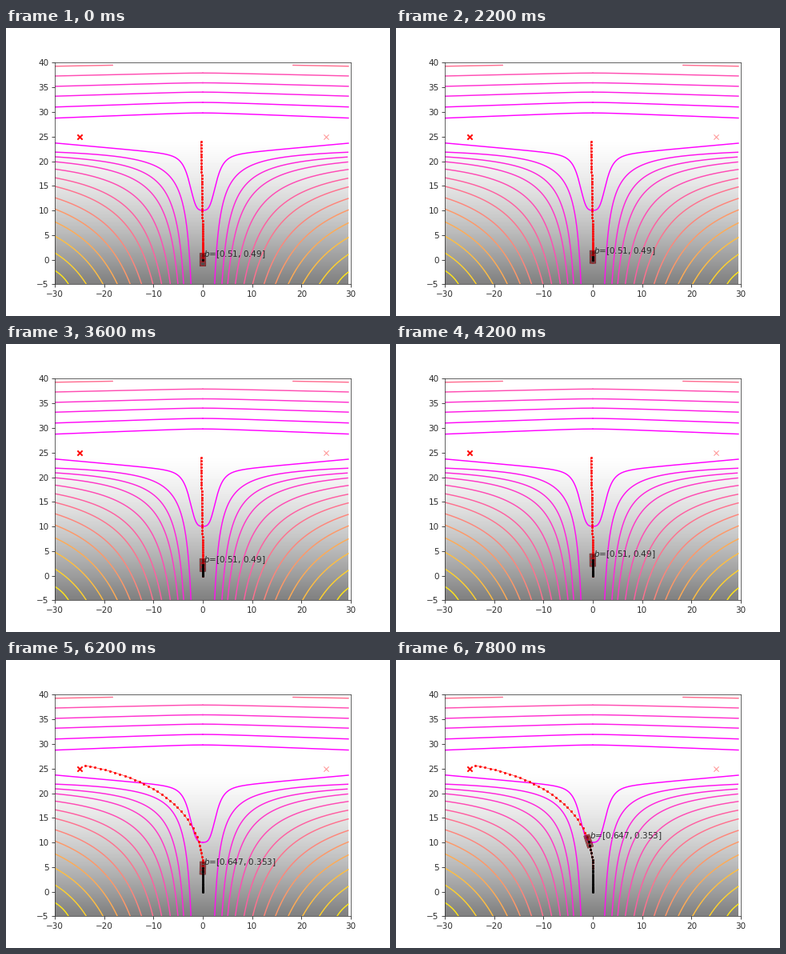
These frames come from a looping animation (480x360 px, 8 s). A matplotlib script:

```python
import numpy as np
import matplotlib.pyplot as plt
from matplotlib.animation import FuncAnimation
from matplotlib.patches import Circle, Rectangle
from matplotlib.transforms import Affine2D

V0, ACC = 0.03, 0.0105      # start speed and half acceleration per step
SWITCH = 20                 # step at which the plan is renewed
INK = "#2a2a2a"
spring = plt.get_cmap("spring")

plt.rcParams.update({"axes.edgecolor": INK, "xtick.color": INK,
                     "ytick.color": INK, "text.color": INK,
                     "axes.linewidth": 0.7})
fig = plt.figure(figsize=(6.4, 4.8), dpi=75)
ax = fig.add_axes([61 / 480, 39.6 / 360, 370 / 480, 277 / 360])
ax.set_xlim(-30, 30)
ax.set_ylim(-5, 40)


def dist(s):
    return V0 * s + ACC * s**2


def mirrored(u, y, value):
    """Draw a curve for u = |x| on both sides; the grid ends at x = 29.5."""
    for side in (-1, 1):
        keep = u <= (30 if side < 0 else 29.5)
        ax.plot(side * u[keep], y[keep], color=spring(value), lw=1.4, zorder=2)


def draw_background():
    depth = np.clip((25 - np.linspace(-5, 39.5, 256)) / 30, 0, 1)
    gray = 1 - 0.5 * depth**1.45
    ax.imshow(gray[:, None], extent=(-30, 29.5, -5, 39.5), origin="lower",
              cmap="gray", vmin=0, vmax=1, aspect="auto", zorder=0)


def draw_contours():
    u = np.linspace(0, 30, 301)

    # gently arched lines at the top
    edges = [28.75, 31.0, 33.2, 35.2, 37.3, 39.28]
    arch = 1 - (np.hypot(u, 4) - 4) / (np.hypot(30, 4) - 4)
    for j, edge in enumerate(edges):
        y = edge + (1.05 - 0.11 * j) * arch
        mirrored(u, np.where(y > 39.5, np.nan, y), 0.43 * (j / 5) ** 1.6)

    # funnel through the middle
    mirrored(u, 10 + 0.09 * u + 11 * u**3.7 / (u**3.7 + 2.75**3.7), 0.0)

    # hyperbolas, each through its edge, shoulder and bottom point
    depths = [3.15, 4.1, 5.1, 6.6, 8.35, 10.1, 12.4, 14.7, 17.3, 20.2,
              23.6, 27.2]
    for i, d in enumerate(depths):
        foot = d - 0.75 * 0.3**i
        mid = np.sqrt(30 * d) * (1 - 0.24 * 0.7**i)
        px = np.array([30, mid, foot])
        py = np.array([25 - d, 25 - mid, -5])
        a, b, c = np.linalg.solve(np.c_[px, py, np.ones(3)], px * py)
        v = np.geomspace(foot, 30, 250)
        mirrored(v, (a * v + c) / (v - b), 0.07 + 0.075 * i)


def first_plan():
    s = np.arange(53)
    y = np.where(s <= 25, dist(s), dist(25) + 0.615 * (s - 25))
    return np.c_[-0.4 * (y / 24) ** 1.5, y]


def second_plan():
    t = np.linspace(0, 1, 600)[:, None]
    p = np.array([[0, dist(SWITCH)], [0, 15], [-8.3, 22.9], [-23.9, 25.6]])
    curve = ((1 - t)**3 * p[0] + 3 * t * (1 - t)**2 * p[1]
             + 3 * t**2 * (1 - t) * p[2] + t**3 * p[3])
    arc = np.r_[0, np.cumsum(np.hypot(*np.diff(curve, axis=0).T))]
    steps = np.minimum(0.47 + 0.045 * np.arange(36), 0.95)
    at = np.r_[0, np.cumsum(steps)]
    at *= arc[-1] / at[-1]
    return np.c_[np.interp(at, arc, curve[:, 0]),
                 np.interp(at, arc, curve[:, 1])]


draw_background()
draw_contours()
ax.scatter([-25], [25], marker="x", s=36, color="red", lw=1.9, zorder=3)
ax.scatter([25], [25], marker="x", s=36, color="red", lw=0.9, alpha=0.45,
           zorder=3)

plans = [first_plan(), second_plan()]
beliefs = ["$b$=[0.51, 0.49]", "$b$=[0.647, 0.353]"]
driven = np.vstack([plans[0][:SWITCH], plans[1]])

plan_line, = ax.plot([], [], "r.-", lw=0.5, ms=5, mew=0.4, zorder=4)
trail, = ax.plot([], [], "k.-", lw=0.5, ms=5, mew=0.4, zorder=6)
body = Rectangle((-0.6, -1.3), 1.2, 2.6, fc=(0, 0, 0, 0.35),
                 ec=(0.35, 0, 0, 0.7), lw=0.7, zorder=5)
discs = [Circle((0, c), 0.5, fc=(0.2, 0, 0, 0.25), ec=(0.85, 0.05, 0.1, 0.8),
                lw=0.7, zorder=5) for c in (-0.8, 0, 0.8)]
car = [body, *discs]
for part in car:
    ax.add_patch(part)
label = ax.text(0, 0, "", fontsize=10, zorder=7)


def update(i):
    phase = int(i >= 26)
    s = int(np.clip(i - 5, 0, SWITCH)) + max(i - 31, 0)
    x, y = driven[s]
    dx, dy = driven[s + 1] - driven[max(s - 1, 0)]
    turn = Affine2D().rotate(np.arctan2(-dx, dy)).translate(x, y)
    for part in car:
        part.set_transform(turn + ax.transData)
    plan_line.set_data(*plans[phase].T)
    trail.set_data(*driven[:s + 1].T)
    label.set_position((x + 0.2, y + 0.6))
    label.set_text(beliefs[phase])
    return [plan_line, trail, label, *car]


anim = FuncAnimation(fig, update, frames=40, interval=200, repeat=True,
                     repeat_delay=0, blit=False)
plt.show()
```
